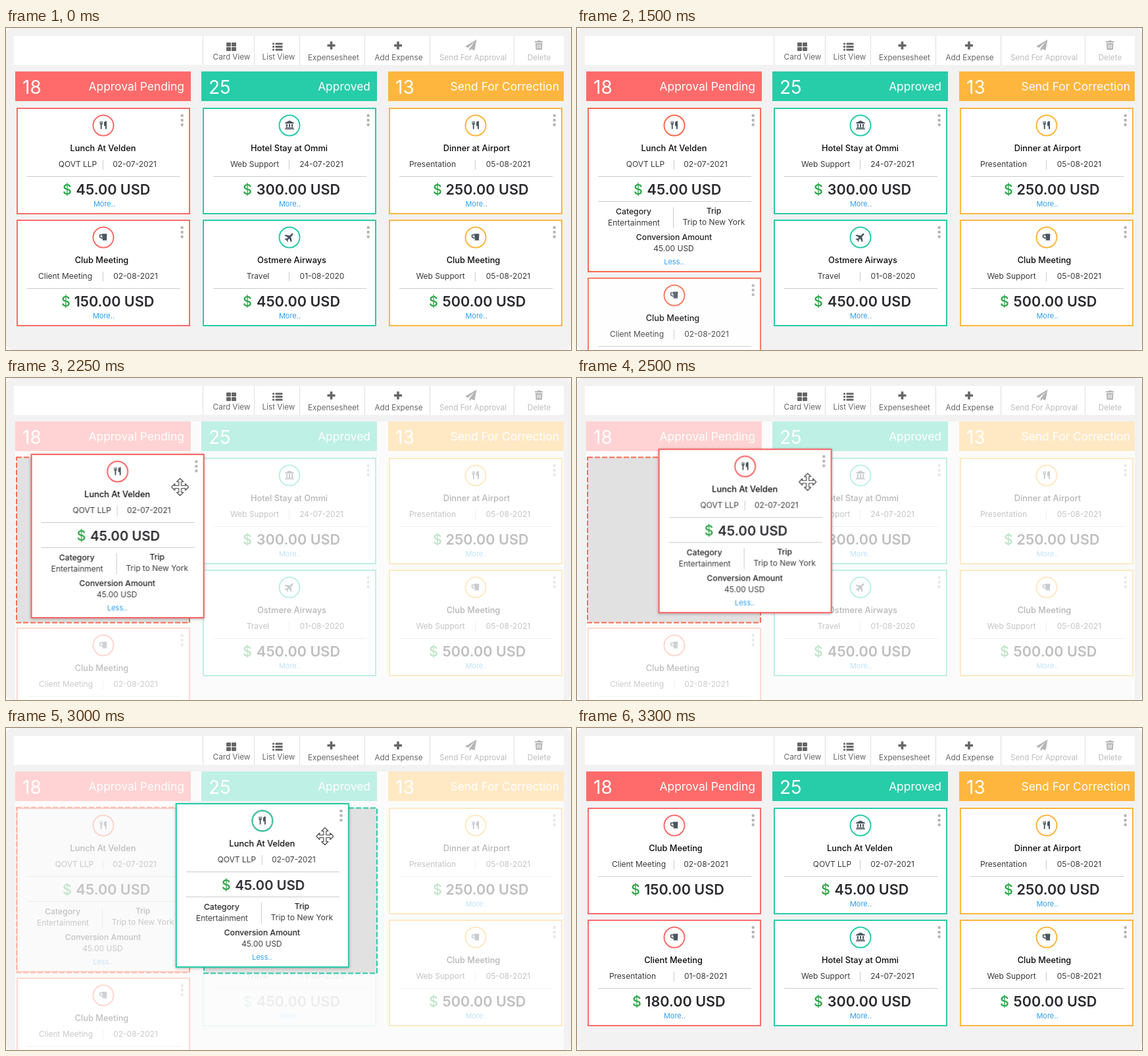
These frames come from a looping animation (859 by 489 pixels, 5.55 s). An HTML page:

```html
<!DOCTYPE html>
<html lang="en">
<head>
<meta charset="utf-8">
<title>Expense board</title>
<style>
html, body { margin: 0; width: 100%; height: 100%; overflow: hidden; background: #fff; }
svg { display: block; width: 859px; height: 489px; font-family: Inter, "Open Sans", sans-serif; }
.mid { text-anchor: middle; }
.end { text-anchor: end; }
.num { font-size: 28px; fill: #fff; }
.head { font-size: 17.4px; fill: #fff; }
.tool { font-size: 11.7px; fill: #666; }
.off { fill: #bdbdbd; }
.title { font-size: 12.8px; font-weight: 500; fill: #0c0c0c; }
.row { font-size: 12px; fill: #3a3a3a; }
.sub { font-size: 12.2px; font-weight: 500; fill: #222; }
.amt { font-size: 21.6px; font-weight: 600; fill: #2b2b2f; }
.small { font-size: 20.3px; }
.usd { font-size: 21.5px; font-weight: 500; fill: #28a745; }
.link { font-size: 11px; fill: #2f9ff0; }
.pill { font-size: 11px; font-weight: 500; fill: #fff; }
.ico { fill: #4a5660; }

/* one loop = 5550 ms; pose changes run on a 50 ms beat */
#before, #open, #push, #hover, #first, #second, #mid, #veil, #slot1, #slot2, #drag, #move, #teal {
  animation: 5550ms step-end infinite;
}
#before { animation-name: before; }
#hover { animation-name: hover; }
#open { animation-name: open; }
#push { animation-name: push; }
#mid { animation-name: mid; }
#first { animation-name: first; }
#second { animation-name: second; }
#veil { animation-name: veil; }
#slot1 { animation-name: slot1; }
#slot2, #teal { animation-name: arrive; }
#drag { animation-name: veil, drag; filter: drop-shadow(0 1px 2px rgba(0, 0, 0, .3)); }
#move { animation-name: cursor; }

@keyframes before {
  0% { opacity: 1; }
  18.01% { opacity: 1; animation-timing-function: steps(10); }
  27.02%, 100% { opacity: 0; }
}
@keyframes hover { 0% { opacity: 0; } 18.01%, 100% { opacity: 1; } }
@keyframes open {
  0% { opacity: 0; }
  18.01% { opacity: 0; animation-timing-function: steps(10); }
  27.02% { opacity: 1; }
  39.63% { opacity: 0; }
  48.64% { opacity: 0; animation-timing-function: steps(6); }
  54.05%, 100% { opacity: 1; }
}
@keyframes push {
  0% { opacity: 0; }
  18.01% { opacity: 0; animation-timing-function: steps(10); }
  27.02%, 100% { opacity: .88; }
}
@keyframes mid {
  0% { opacity: 1; }
  48.64% { opacity: 1; animation-timing-function: steps(8); }
  55.85%, 100% { opacity: 0; }
}
@keyframes first { 0% { opacity: 1; } 59.45%, 100% { opacity: 0; } }
@keyframes second { 0% { opacity: 0; } 59.45%, 100% { opacity: 1; } }
@keyframes veil { 0% { opacity: 0; } 36.03% { opacity: 1; } 59.45%, 100% { opacity: 0; } }
@keyframes slot1 {
  0% { opacity: 0; fill-opacity: 1; }
  39.63% { opacity: 1; fill-opacity: 1; }
  48.64% { opacity: 1; fill-opacity: 1; animation-timing-function: steps(10); }
  57.65%, 100% { opacity: 0; fill-opacity: 0; }
}
@keyframes arrive {
  0% { opacity: 0; }
  48.64% { opacity: 0; animation-timing-function: steps(6); }
  54.05% { opacity: 1; }
  59.45%, 100% { opacity: 0; }
}
@keyframes cursor { 0% { opacity: 0; } 39.63%, 100% { opacity: 1; } }
@keyframes drag {
  0% { transform: translate(16px, 121px); }
  39.63% { transform: translate(20.4px, 116.6px); animation-timing-function: steps(9); }
  47.74% { transform: translate(175.2px, 102.6px); }
  48.64% { transform: translate(175.2px, 102.6px); animation-timing-function: steps(10); }
  57.65%, 100% { transform: translate(312.8px, 121.5px); }
}
</style>
</head>
<body>
<svg id="stage" viewBox="0 0 859 489"></svg>
<script>
const RED = '#ff6b6b', CORAL = '#ff6b4f', TEAL = '#27cca9', AMBER = '#ffb63f';
const COLS = [16, 299, 582];

const text = (cls, x, y, s) => `<text class="${cls}" x="${x}" y="${y}">${s}</text>`;
const mid = (cls, x, y, s) => text('mid ' + cls, x, y, s);
const rect = (x, y, w, h, fill, more = '') =>
  `<rect x="${x}" y="${y}" width="${w}" height="${h}" fill="${fill}" ${more}/>`;
const path = (d, more = '') => `<path d="${d}" ${more}/>`;
const group = (id, ...parts) => `<g id="${id}">${parts.join('')}</g>`;
const at = (x, y, body) => `<g transform="translate(${x} ${y})">${body}</g>`;

const ICONS = {
  food: path('M-5.5-6v3.6q0 1.4 1.3 1.9V6h1.9V-.5Q-1-1-1-2.4V-6h-.9v3.2h-.8V-6h-1.1v3.2h-.8V-6zM1-3.5Q1.5-6.3 5-6.3V6H3V1.3H1z'),
  bank: path('M-7-3.5L0-7 7-3.5v1H-7zM-5-1.8h2V3h-2zM-1-1.8h2V3h-2zM3-1.8h2V3H3zM-6 3.4H6v1.3H-6zM-7 5.2H7v1.3H-7z'),
  jet: path('M0-7.5q1.3 0 1.3 2.2V-2L7 2v1.8L1.3 2V5L3 6.3v1.2l-3-.8-3 .8V6.3L-1.3 5V2L-7 3.8V2l5.7-4v-3.3Q-1.3-7.5 0-7.5z', 'transform="rotate(45)"'),
  mug: path('M-2.2-5H5.5L5 3.4 5.5 5h-7l.5-1.6z') +
    path('M-2-3.2h-3.4V0l4 2.2', 'fill="none" stroke="#4a5660" stroke-width="1.6"')
};

const outline = (c, h) => rect(1, 1, 262, h - 2, 'none', `stroke="${c}" stroke-width="2"`) +
  `<circle cx="132" cy="27" r="15.5" fill="none" stroke="${c}" stroke-width="2"/>`;

// [text, centre] pairs; positions are relative to the card
function body(color, icon, title, row, date, sign, amount, link, h = 162, size = '') {
  const dots = [13, 20, 27].map(y => `<circle cx="251.7" cy="${y - 1}" r="2.2" fill="#b4b4b4"/>`).join('');
  return rect(0, 0, 264, h, '#fff') + outline(color, h) + dots +
    `<g class="ico" transform="translate(132 26.5)">${ICONS[icon]}</g>` +
    mid('title', title[1], 66, title[0]) +
    mid('row', row[1], 90, row[0]) + mid('row', date[1], 90, date[0]) +
    rect(131, 79, 1, 15, '#ccc') + rect(16, 104, 233, 1, '#cbcbcb') +
    mid('usd', sign, 132, '$') + mid('amt ' + size, amount[1], 132, amount[0] + ' USD') +
    (link ? mid('link', link, 150, 'More..') : '');
}
const card = (col, y, ...rest) => at(COLS[col], y, body(...rest));

const details = () =>
  rect(16, 142, 233, 1, '#cbcbcb') + rect(130, 151, 1, 32, '#ccc') +
  mid('sub', 70, 162, 'Category') + mid('row', 70.5, 179, 'Entertainment') +
  mid('sub', 192, 161, 'Trip') + mid('row', 192, 178, 'Trip to New York') +
  mid('sub', 131.5, 201, 'Conversion Amount') +
  mid('row', 131, 218, '45.00 USD') + mid('link', 131.5, 238, 'Less..');

const LUNCH = 'Lunch At Velden', HOTEL = 'Hotel Stay at Ommi', FIRM = 'QOVT LLP';
const lunch = (c, rowX, link, h, x = 147, size) =>
  body(c, 'food', [LUNCH, 131.5], [FIRM, rowX], ['02-07-2021', 179.5], 77, ['45.00', x], link, h, size);
const hotel = y => card(1, y, TEAL, 'bank', [HOTEL, 131.5], ['Web Support', 79],
  ['24-07-2021', 180.5], 68, ['300.00', 145.5], 132.5);
const club = (c, rowX) => body(c, 'mug', ['Club Meeting', 129.5], ['Client Meeting', rowX],
  ['02-08-2021', 181], 75, ['150.00', 148.5], 132.5);

function toolbar() {
  const plus = x => path(`M${x - 6} 26.5h12M${x} 20.5v12`, 'stroke="#666" stroke-width="3.6"');
  const labels = [['Card View', 343, 48], ['List View', 414.5, 48], ['Expensesheet', 498, 49],
    ['Add Expense', 597, 49], ['Send For Approval', 710, 49, 'off'], ['Delete', 810.5, 49, 'off']];
  let s = rect(12, 12, 836, 44, '#fff');
  for (const x of [299, 377, 446, 545, 644, 772]) s += rect(x, 12, 1, 44, '#dedede');
  for (const [name, x, y, off = ''] of labels) s += mid('tool ' + off, x, y, name);
  for (const x of [335, 343]) for (const y of [22, 29]) s += rect(x, y, 7, 6, '#666', 'rx="1"');
  for (const y of [22.5, 27, 31.5]) s += rect(405, y, 3, 3, '#666', 'rx="1"') + rect(409.5, y, 11, 3, '#666', 'rx=".5"');
  s += plus(494.5) + plus(596);
  s += path('M715.5 17.5L698 28l4.3 2 10-8.8-7.6 9.8v4l2.8-2.9 4.9 2z', 'fill="#b5b5b5"');
  s += path('M804 20h4l1-1.3h3l1 1.3h3v2h-12zM805 23h10.5l-.6 10h-9.3z', 'fill="#b5b5b5"');
  s += path('M808 25v6M810.3 25v6M812.6 25v6', 'stroke="#fff" stroke-width="1"');
  return s;
}

const header = (x, c, n, label, right) => rect(x, 66, 267, 45, c) +
  text('num', x + 11, 100, n) + text('end head', right, 95, label);

const slot = (id, x, y, c) => group(id, rect(x, y, 263, 251, '#e1e1e1',
  `stroke="${c}" stroke-width="2" stroke-dasharray="8 3"`));

const cursor = path('M0-13L5-8H2V-2H8V-5L13 0 8 5V2H2V8H5L0 13-5 8H-2V2H-8V5L-13 0-8-5V-2H-2V-8H-5Z',
  'fill="#fff" stroke="#444" stroke-width="1.2" stroke-linejoin="round"');

const pill = group('hover', rect(121, 256.5, 54, 21.5, '#505d66', 'rx="10.7"'), mid('pill', 149.5, 271, 'More..'));

document.getElementById('stage').innerHTML = [
  rect(0, 0, 859, 489, '#f2f2f2', 'rx="9"'),
  toolbar(),
  header(14, RED, 18, 'Approval Pending', 271),
  header(297, TEAL, 25, 'Approved', 554),
  header(581, AMBER, 13, 'Send For Correction', 841),
  card(2, 121, AMBER, 'food', ['Dinner at Airport', 133.5], ['Presentation', 66.5],
    ['05-08-2021', 181.5], 74, ['250.00', 149.5], 133),
  card(2, 291, AMBER, 'mug', ['Club Meeting', 128.5], ['Web Support', 78.5],
    ['05-08-2021', 181.5], 68, ['500.00', 145], 133),
  group('first',
    group('before', at(16, 121, lunch(RED, 93, 133.5)), pill, at(16, 291, club(RED, 74))),
    group('open', at(16, 121, lunch(CORAL, 88, 0, 250) + details())),
    group('push', at(16, 379, club(CORAL, 75))),
    group('mid', hotel(121), card(1, 291, TEAL, 'jet', ['Ostmere Airways', 135.5], ['Travel', 84],
      ['01-08-2020', 181.5], 68, ['450.00', 145.5], 132.5))),
  group('second',
    card(0, 121, RED, 'mug', ['Club Meeting', 134], ['Client Meeting', 78],
      ['02-08-2021', 180], 73, ['150.00', 147], 0),
    card(0, 291, RED, 'mug', ['Client Meeting', 130.5], ['Presentation', 68.5],
      ['01-08-2021', 179.5], 75, ['180.00', 148.5], 132.5),
    card(1, 121, TEAL, 'bank', [LUNCH, 131], [FIRM, 89],
      ['02-07-2021', 180.5], 79, ['45.00', 149], 132.5),
    hotel(291)),
  group('veil', rect(14, 66, 834, 423, '#fff', 'opacity=".7"')),
  slot('slot1', 16, 120.5, CORAL),
  slot('slot2', 301, 121.5, TEAL),
  group('drag', lunch('#fb6262', 93, 0, 250, 143.5, 'small'), details(),
    group('teal', outline(TEAL, 250)), group('move', at(227, 50.5, cursor)))
].join('');
</script>
</body>
</html>
```
